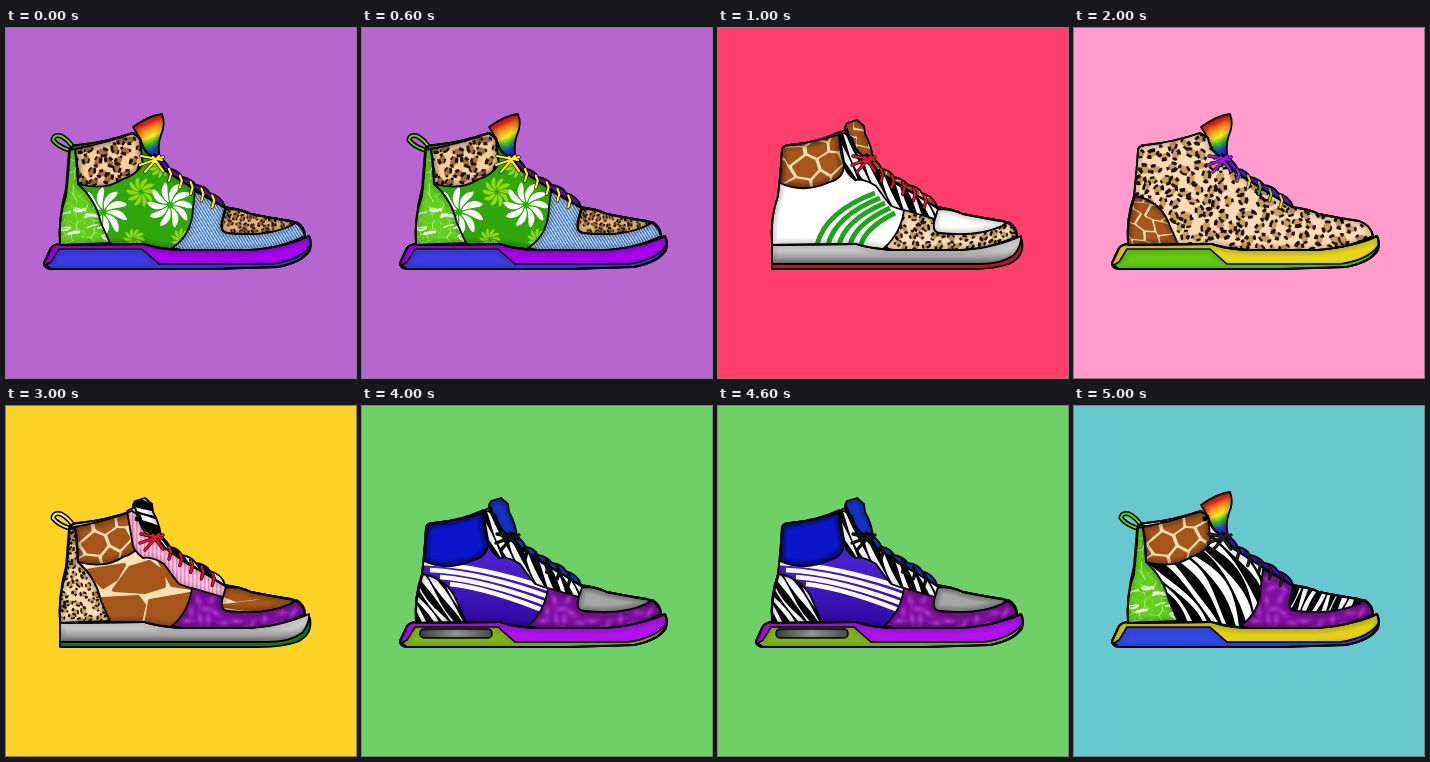
An HTML page with a canvas for the animation above (6000 ms loop, 350 by 350 pixels).

```html
<!DOCTYPE html>
<html lang="en">
<head>
<meta charset="utf-8">
<title>Sneaker mix</title>
<style>
html, body { margin: 0; width: 100%; height: 100%; overflow: hidden; }
canvas { display: block; width: 350px; height: 350px; }
</style>
</head>
<body>
<canvas id="stage" width="350" height="350"></canvas>
<script>
const SIZE = 350, HOLD = 1000;
const AREA = { x0: 36, y0: 80, x1: 310, y1: 245 };
const view = document.getElementById('stage').getContext('2d');
let c, seed = 1;

const rand = () => {
  seed = (seed * 16807) % 2147483647;
  return seed / 2147483647;
};
const hash = (a, b) => {
  const s = Math.sin(a * 127.1 + b * 311.7) * 43758.5453;
  return s - Math.floor(s);
};

// ---- outlines ----
const P = {
  upper: 'M54 217Q52 190 60 168Q63 140 64 121Q66 117 72 117Q100 114 126 105L134 110Q137 126 150 130L160 143L190 162L218 179Q235 181 245 186Q270 191 285 193Q297 197 299 208Q270 222 235 222L175 222Q150 220 138 216Z',
  collar: 'M69 121Q100 115 128 105L134 112Q135 122 137 136Q129 148 117 151Q100 163 72 156Q72 135 69 121Z',
  bigCollar: 'M64 121Q66 117 72 117Q100 114 121 104Q122 125 126 137Q126 150 112 154Q85 166 62 155Z',
  heel: 'M54 217Q52 190 60 160L63 122L69 121Q71 140 72 156Q90 172 95 195L104 215Z',
  lowHeel: 'M54 217Q53 190 61 168Q82 172 92 189L104 216Z',
  stay: 'M121 105L129 101Q133 118 140 128L158 141L180 157L205 171L222 182L217 191Q203 191 190 184L173 178Q165 168 158 158Q146 150 137 152Q126 144 126 134Z',
  gap: 'M148 126Q160 132 164 141Q172 142 176 149Q186 151 190 157Q200 158 204 165Q216 168 219 179L205 175L156 146Z',
  mud: 'M186 182L217 191Q213 204 222 205Q260 209 284 198L291 194Q299 199 299 208Q275 222 235 222L175 222L166 220Q183 205 186 182Z',
  highMud: 'M189 163L219 180L216 193Q213 204 222 205Q260 209 284 198L291 194Q299 199 299 208Q275 222 235 222L175 222L166 220Q186 207 187 180Z',
  toe: 'M220 181Q235 181 245 186Q270 191 289 194L284 198Q260 209 222 205Q213 204 217 191Z',
  flare: 'M127 99Q144 87 156 86Q160 96 155 107Q151 118 154 130L141 130Q136 112 127 99Z',
  tongue: 'M127 99L129 95L139 92L146 98L147 106Q153 116 155 130L141 130Q134 116 127 104Z',
  flatSole: 'M54 216L138 216Q155 222 180 222L240 222Q280 219 303 208Q304 217 296 227Q284 236 262 236L54 236Z',
  flatBase: 'M54 235L262 235Q290 235 304 212Q307 229 291 236Q276 241 255 241L54 241Z',
  sole: 'M38 235L45 220Q47 217 53 216L138 216Q155 222 180 222L240 222Q280 219 303 208Q306 214 304 222Q297 234 272 239L205 241L45 241Q38 240 38 235Z',
  wedge: 'M53 221L136 221L153 236L266 236Q294 232 304 218Q301 233 272 239L205 241L45 241L40 237L45 234Z',
  patches: 'M80 165L118 159L110 173L97 181ZM124 162L143 156L157 166L158 180L139 186L108 184ZM152 152L165 168L186 182L166 179ZM96 193L132 191L138 199L134 217L106 217ZM144 195L184 188L180 208L164 222L140 218ZM222 183L240 186L262 190L230 194L220 190ZM218 200L250 196L270 192L292 196L262 206Z'
};
for (const k in P) P[k] = new Path2D(P[k]);

// ---- fabrics ----
const flat = color => () => {
  c.fillStyle = color;
  c.fillRect(0, 0, SIZE, SIZE);
};

const blend = (x0, y0, x1, y1, ...colors) => () => {
  const g = c.createLinearGradient(x0, y0, x1, y1);
  colors.forEach((col, i) => g.addColorStop(i / (colors.length - 1), col));
  flat(g)();
};

function scatter(gap, draw) {
  let row = 0;
  for (let y = AREA.y0; y < AREA.y1; y += gap * .87, row++) {
    for (let x = AREA.x0 + (row % 2) * gap / 2; x < AREA.x1; x += gap) {
      c.save();
      c.translate(x + (rand() - .5) * gap * .5, y + (rand() - .5) * gap * .5);
      c.rotate(rand() * Math.PI * 2);
      draw();
      c.restore();
    }
  }
}

// Long tan patches, each flanked by broken dark strokes of uneven weight.
const leopard = (gap, base = '#fbdcb2', tan = '#cb9c5c') => () => {
  seed = 71;
  flat(base)();
  c.lineCap = 'butt';
  scatter(gap, () => {
    const rx = gap * (.34 + rand() * .12), ry = gap * (.2 + rand() * .1);
    c.fillStyle = tan;
    c.beginPath();
    c.ellipse(0, 0, rx, ry, 0, 0, 7);
    c.fill();
    c.strokeStyle = '#17110b';
    let from = rand() * 2;
    for (let i = 0; i < 3; i++) {
      c.lineWidth = gap * (.15 + rand() * .14);
      c.beginPath();
      c.ellipse(0, 0, rx, ry, 0, from, from + .7 + rand() * .8);
      c.stroke();
      from += 2.1;
    }
  });
};

// Jittered honeycomb, each cell pulled in towards its middle.
const cells = (gap, fill, base, inset, tilt = 0, jitter = .5) => () => {
  flat(base)();
  c.save();
  c.translate(60, 120);
  c.rotate(tilt);
  c.fillStyle = c.strokeStyle = fill;
  c.lineJoin = 'round';
  c.lineWidth = gap * .14;
  const corner = (k, j) => [
    (k / 2 + (hash(k, j) - .5) * jitter) * gap,
    (j + ((k + j) & 1 ? -.12 : .12) + (hash(j + 9, k) - .5) * jitter) * gap * .72
  ];
  const n = Math.ceil(300 / gap);
  for (let j = -n; j < n; j++) for (let i = -n; i < n; i++) {
    const k = 2 * i + (j & 1);
    const pts = [[k, j], [k + 1, j], [k + 2, j], [k + 2, j + 1], [k + 1, j + 1], [k, j + 1]]
      .map(p => corner(...p));
    const mx = pts.reduce((s, p) => s + p[0], 0) / 6;
    const my = pts.reduce((s, p) => s + p[1], 0) / 6;
    c.beginPath();
    for (const [x, y] of pts) c.lineTo(mx + (x - mx) * inset, my + (y - my) * inset);
    c.closePath();
    c.fill();
    c.stroke();
  }
  c.restore();
};
const giraffe = (gap, tilt) => cells(gap, '#a5561b', '#fbe0b0', .73, tilt);

const bigGiraffe = () => {
  flat('#fbe0b0')();
  c.fillStyle = c.strokeStyle = '#a5561b';
  c.lineJoin = 'round';
  c.lineWidth = 4;
  c.fill(P.patches);
  c.stroke(P.patches);
};

const water = () => {
  cells(12, '#62cf1c', '#f4ffec', .82, .6, .8)();
  seed = 12;
  c.strokeStyle = '#f4ffec';
  c.lineCap = 'round';
  for (let i = 0; i < 16; i++) {
    const x = 54 + rand() * 44, y = 178 + rand() * 38;
    c.lineWidth = 1 + rand() * 2;
    c.beginPath();
    c.moveTo(x, y);
    c.quadraticCurveTo(x + 4, y + rand() * 6 - 3, x + 10, y + rand() * 10 - 5);
    c.stroke();
  }
};

const zebra = (gap, angle, curve = 0) => () => {
  flat('#fff')();
  c.save();
  c.translate(140, 180);
  c.rotate(angle);
  c.fillStyle = '#000';
  const mid = (i, s) =>
    i * gap + curve * s * s + Math.sin(s / (gap * 1.9) + i * 1.3) * gap * .16;
  for (let i = -40; i < 40; i++) {
    c.beginPath();
    for (const side of [-1, 1]) {
      for (let q = -160; q <= 160; q += 3) {
        const s = q * -side;
        const w = gap * (.27 + .17 * Math.sin(s / (gap * 1.5) + i * 2.1));
        c.lineTo(s, mid(i, s) + side * w);
      }
    }
    c.fill();
  }
  c.restore();
};

const cloud = () => {
  seed = 33;
  flat('#7e0f9f')();
  scatter(13, () => {
    const g = c.createRadialGradient(0, 0, 0, 0, 0, 9);
    g.addColorStop(0, 'rgba(190,66,222,.8)');
    g.addColorStop(1, 'rgba(170,40,205,0)');
    c.fillStyle = g;
    c.scale(1, .5);
    c.fillRect(-9, -9, 18, 18);
  });
};

const denim = () => {
  flat('#78a6dc')();
  for (let x = 60; x < 330; x += 3) {
    c.lineWidth = 1;
    for (const [dx, col] of [[0, '#d6e7fa'], [1.4, '#3e6eae']]) {
      c.strokeStyle = col;
      c.setLineDash([3 + hash(x, dx) * 3, 1.5]);
      c.beginPath();
      c.moveTo(x + dx, 150);
      c.lineTo(x + dx + 50, 230);
      c.stroke();
    }
  }
  c.setLineDash([]);
};

function flower(x, y, r, color, turn = 0) {
  c.fillStyle = color;
  for (let i = 0; i < 10; i++) {
    c.save();
    c.translate(x, y);
    c.rotate(turn + i * Math.PI / 5);
    c.scale(r, r);
    c.beginPath();
    c.moveTo(.12, 0);
    c.bezierCurveTo(.4, -.28, .8, -.24, 1, .1);
    c.bezierCurveTo(.85, .24, .6, .02, .12, 0);
    c.fill();
    c.restore();
  }
}
const flowers = () => {
  flat('#2fa60b')();
  const lime = '#95d916';
  flower(135, 164, 15, lime);
  flower(154, 138, 12, lime, .3);
  flower(128, 211, 11, lime);
  flower(176, 211, 11, lime, .2);
  flower(97, 184, 25, '#fff', .2);
  flower(164, 177, 23, '#fff');
};

const bands = (base, color, width, count, curve) => () => {
  base();
  c.strokeStyle = color;
  c.lineWidth = width;
  c.lineCap = 'butt';
  for (let i = 0; i < count; i++) c.stroke(new Path2D(curve(i)));
};
const greenBands = bands(flat('#fff'), '#1fa51b', 5, 5,
  i => `M${99 + 11 * i} 217Q${107 + 10 * i} ${184 + 4 * i} ${157 + 5 * i} ${165 + 5 * i}`);
const whiteBands = bands(blend(0, 155, 0, 220, '#4a22cc', '#2f08a4'), '#fff', 4.5, 4,
  i => `M${58 + 10 * i} ${157 + 7 * i}Q${118 + 4 * i} ${159 + 8 * i} 190 ${184 + 8 * i}`);

const pinstripe = () => {
  flat('#ffc6e2')();
  c.fillStyle = '#f487bd';
  for (let x = 110; x < 230; x += 4) c.fillRect(x, 90, 1.5, 120);
};

const rainbow = blend(138, 90, 154, 126,
  '#d81616', '#e8301a', '#ff9a1c', '#ffee20', '#35bd22', '#1544dc', '#5a10b0');
const laceRainbow = blend(150, 130, 215, 180,
  '#8a10e0', '#2b35e8', '#5a10d8', '#2b35e8', '#7a0fd0');

// ---- building a shoe ----
function ink(path, width = 1.8) {
  c.strokeStyle = '#000';
  c.lineWidth = width;
  c.lineJoin = 'round';
  c.stroke(path);
}

function part(path, fabric, shade = .07, line = 1.8) {
  c.save();
  c.clip(path);
  fabric();
  c.strokeStyle = `rgba(0,0,0,${shade})`;
  c.lineJoin = 'round';
  for (let w = 3; w <= 13; w += 2) {
    c.lineWidth = w;
    c.stroke(path);
  }
  c.restore();
  if (line) ink(path, line);
}

function loop(color) {
  const path = new Path2D('M66 123Q52 119 47 112Q48 106 55 108Q63 112 68 121');
  c.lineCap = 'round';
  ink(path, 5);
  c.strokeStyle = color;
  c.lineWidth = 2;
  c.stroke(path);
}

function laces(colors) {
  const bow = 'M135 128L156 132M134 137L157 129M139 144L153 128M147 129L157 143';
  const ties = [0, 1, 2, 3, 4].map(i => `M${163 + 10.8 * i} ${141 + 6.6 * i}l2 5l-2 7`);
  const path = new Path2D(bow + ties.join(''));
  const tint = c.createLinearGradient(134, 130, 215, 178);
  colors.forEach((col, i) => tint.addColorStop(i / Math.max(1, colors.length - 1), col));
  c.lineCap = 'round';
  ink(path, 3.4);
  c.strokeStyle = tint;
  c.lineWidth = 2.2;
  c.stroke(path);
}

function flatSole(color) {
  part(P.flatBase, flat(color), .03);
  part(P.flatSole, blend(0, 216, 0, 237, '#d6d6d6', '#c4c4c4', '#9c9c9c', '#666'), .02);
}

function wedgeSole(top, low, slot) {
  part(P.sole, flat(top), .03, 2);
  part(P.wedge, flat(low), .02, 1.6);
  ink(P.sole, 2);
  if (!slot) return;
  const hole = new Path2D();
  hole.roundRect(58, 223, 72, 9, 4);
  part(hole, blend(58, 0, 130, 0, '#444', '#aaa', '#555'), .04, 1.5);
}

function eyelet() {
  c.fillStyle = '#000';
  c.beginPath();
  c.arc(131, 113, 2.4, 0, 7);
  c.fill();
}

function shoe(s) {
  const layer = document.createElement('canvas');
  layer.width = layer.height = SIZE;
  c = layer.getContext('2d');
  flat(s.back)();
  if (s.loop) loop(s.loop);
  part(s.flare ? P.flare : P.tongue, s.tongue, .04);
  part(P.gap, s.gap, .03);
  if (s.wedge) wedgeSole(...s.wedge);
  else flatSole(s.base);
  part(P.upper, s.body, s.soft || .06);
  for (const [name, fabric, shade] of s.parts) part(P[name], fabric, shade);
  ink(P.upper);
  if (s.eyelet) eyelet();
  laces(s.lace);
  return layer;
}

const shoes = [
  {
    back: '#b766d0', loop: '#5fd31c', flare: true, tongue: rainbow, gap: flat('#6015a8'),
    wedge: ['#a800f0', '#3a3ae0'], body: flowers, soft: .04, lace: ['#fff21c'],
    parts: [['heel', water, .03], ['collar', leopard(12, '#f5cf9c', '#a8703a'), .05],
      ['highMud', denim, .03], ['toe', leopard(7.5, '#e6b878', '#9a6630'), .03]]
  },
  {
    back: '#ff3f6b', tongue: giraffe(20, .5), gap: giraffe(14, .2),
    base: '#c91d38', body: greenBands, soft: .035, lace: ['#e0142c'],
    parts: [['bigCollar', giraffe(23, -.2)], ['stay', zebra(8, 1.1), .02],
      ['mud', leopard(10.5), .03], ['toe', flat('#fff'), .03]]
  },
  {
    back: '#ff9ccb', flare: true, tongue: rainbow, gap: laceRainbow,
    wedge: ['#e6d51c', '#62c90e'], body: leopard(13.5), soft: .03,
    lace: ['#c312e8', '#9a18ee', '#7a18ee', '#e8dc1c', '#2fb01c', '#f0c01c', '#e8dc1c'],
    parts: [['lowHeel', giraffe(17, .3), .05]]
  },
  {
    back: '#fcd225', loop: '#fbe0b0', tongue: zebra(11, .35), gap: zebra(9, .8),
    base: '#128a1c', body: bigGiraffe, soft: .04, lace: ['#e0142c'], eyelet: true,
    parts: [['heel', leopard(9.5), .04], ['collar', giraffe(23, -.25), .05],
      ['stay', pinstripe, .03], ['mud', cloud, .04], ['toe', bigGiraffe, .04]]
  },
  {
    back: '#70d068', tongue: flat('#1532c8'), gap: flat('#1538c8'),
    wedge: ['#b010f0', '#7fb51a', true], body: whiteBands, soft: .03, lace: ['#111'],
    parts: [['lowHeel', zebra(8, .95), .03], ['bigCollar', flat('#0b16cc'), .1],
      ['stay', zebra(8, 1.1), .02], ['mud', cloud, .04], ['toe', flat('#a6a6a6'), .06]]
  },
  {
    back: '#68c8d0', loop: '#5fd31c', flare: true, tongue: rainbow, gap: flat('#3c18b4'),
    wedge: ['#e0cf14', '#3148e2'], body: zebra(11.5, .95, .004), soft: .02,
    lace: ['#222'], eyelet: true,
    parts: [['heel', water, .03], ['collar', giraffe(23, -.25), .05],
      ['highMud', cloud, .04], ['toe', zebra(7.5, 2), .02]]
  }
].map(shoe);

const start = performance.now();
function tick() {
  const t = performance.now() - start;
  view.drawImage(shoes[Math.floor(t / HOLD) % shoes.length], 0, 0);
  requestAnimationFrame(tick);
}
tick();
</script>
</body>
</html>
```
